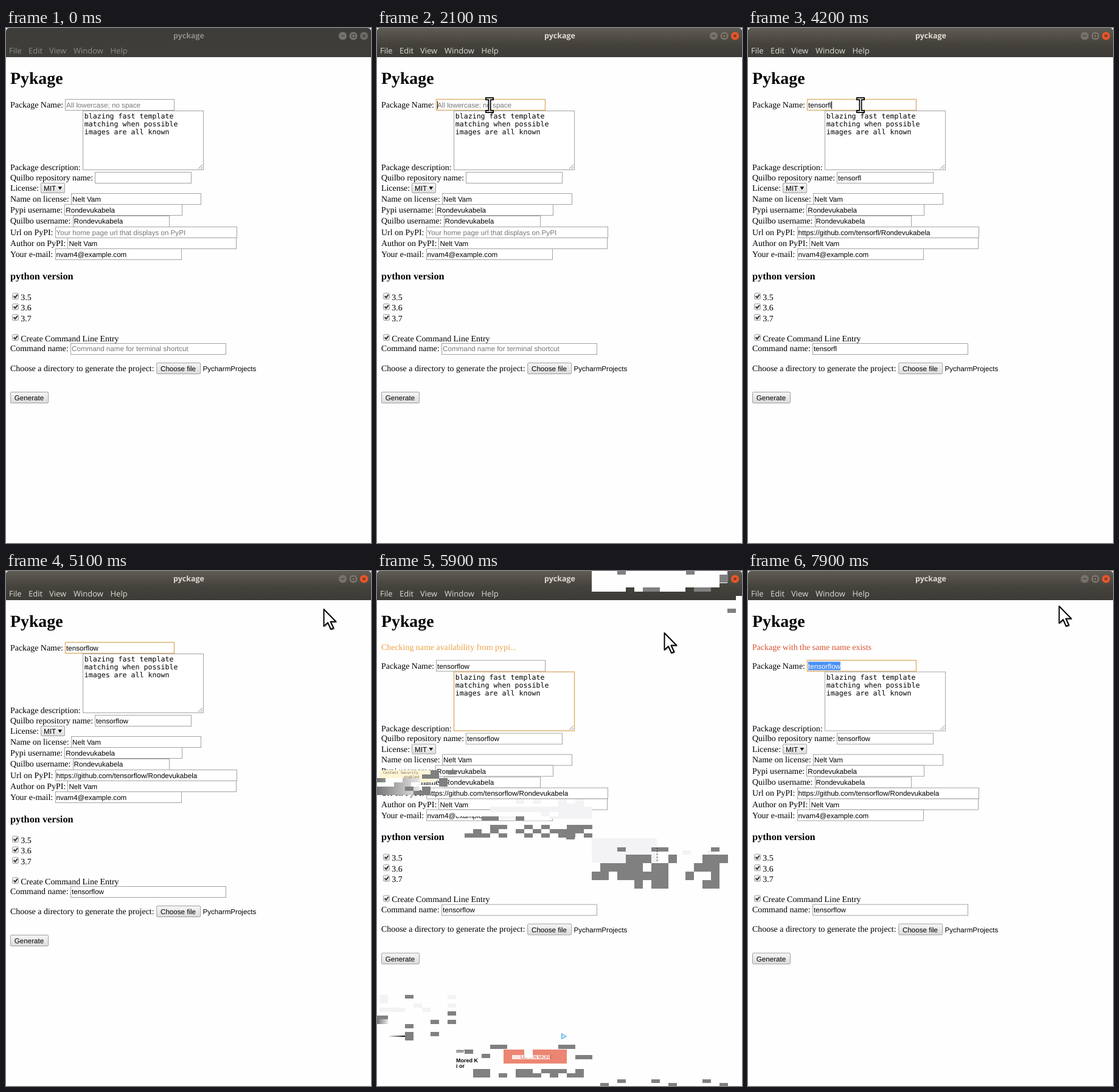
An HTML page for the animation above (8 s loop, 600 px wide and 848 px high).

```html
<!DOCTYPE html>
<html lang="en">
<head>
<meta charset="utf-8">
<title>pyckage</title>
<style>
html, body { margin: 0; width: 100%; height: 100%; overflow: hidden; background: #fefefe; }
svg { display: block; width: 600px; height: 848px; }
text { font: 13.93px "Liberation Serif", "Times New Roman", serif; text-rendering: geometricPrecision; white-space: pre; }
.h1 { font-size: 27.8px; font-weight: bold; }
.h3 { font-size: 16.3px; font-weight: bold; }
.ui { font: 11.62px "Liberation Sans", Arial, sans-serif; }
.mono { font: 11.62px "DejaVu Sans Mono", monospace; }
.bar { font: 13px "Open Sans", "Noto Sans", sans-serif; }
.title { font-size: 12.5px; font-weight: bold; }
.tiny { font: 6px "DejaVu Sans Mono", monospace; }
.box { fill: #fff; stroke: #a3a3a3; }
.box.focus { stroke: #ddb373; stroke-width: 1.5; }
.button { fill: url(#face); stroke: #a0a0a0; }
.hint { fill: #777; }
#chrome { --ink: #8f8c85; --close: #6d6b66; --mark: #3c3b37; }
#chrome.active { --ink: #dfdbd2; --close: #e9562a; --mark: #4b2a1c; }
#chrome:not(.active) #shine { display: none; }
</style>
</head>
<body>
<svg id="stage" viewBox="0 0 600 848"></svg>
<script>
const USER = "Rondevukabela", PERSON = "Nelt Vam", WORD = "tensorflow";
const LOOP = 8000, SHIFT = 29.6;
const fields = [];

const rect = (x, y, w, h, attrs = "") =>
  `<rect x="${x}" y="${y}" width="${w}" height="${h}" ${attrs}/>`;
const text = (x, y, s, cls = "", attrs = "") =>
  `<text x="${x}" y="${y}" class="${cls}" ${attrs}>${s}</text>`;
const snap = v => Math.floor(v) + .5;

// "under" is drawn between the box and its value.
function field(label, y, x, w, value = "", id = "", under = "") {
  fields.push([x, y - 13.5, w, 18.3]);
  return text(7, y, label) +
    rect(snap(x), snap(y - 13.3), Math.round(w), 18, `class="box" ${id && `id="${id}Box"`}`) +
    under + text(x + 1.6, y, value, "ui", id && `id="${id}"`);
}

const check = (y, label) =>
  rect(10.5, y - 11, 10, 10, 'rx="2" class="button"') +
  `<path d="M12.7 ${y - 6.2}l2.3 2.5 4-5" fill="none" stroke="#333" stroke-width="2"/>` +
  text(24.3, y, label);

const button = (x, y, w, label) =>
  rect(x, y - 13.5, w, 18, 'rx="1.5" class="button"') + text(x + 6.3, y, label, "ui");

function chrome() {
  const menu = [[5, "File"], [37, "Edit"], [71, "View"], [111, "Window"], [171.5, "Help"]];
  const shape = "M0 48V6Q0 0 6 0H594Q600 0 600 6V48Z";
  const knob = (x, fill, mark) =>
    `<circle cx="${x}" cy="13" r="6.6" style="fill:${fill}"/>` +
    `<path d="${mark}" transform="translate(${x} 13)" fill="none" style="stroke:var(--mark)" stroke-width="1.1"/>`;
  return `<path d="${shape}" fill="#3e3d39"/><path id="shine" d="${shape}" fill="url(#shade)"/>` +
    text(300.5, 17.3, "pyckage", "bar title", 'text-anchor="middle" style="fill:var(--ink)"') +
    menu.map(([x, s]) => text(x, 42, s, "bar", 'style="fill:var(--ink)"')).join("") +
    knob(553.5, "#75736c", "M-3 0H3") + knob(571, "#75736c", "M-2.5-2.5h5v5h-5z") +
    knob(588.5, "var(--close)", "M-2.2-2.2l4.4 4.4M2.2-2.2l-4.4 4.4");
}

function form() {
  fields.push([126.5, 136.5, 198, 97]);
  const lines = ["blazing fast template", "matching when possible", "images are all known"];
  return field("Package Name:", 131, 97.5, 179, "", "pkg",
      rect(99, 119.8, 54, 14, 'id="mark" fill="#4a90f5"')) +
    rect(99, 120.5, 1, 13, 'id="caret"') +
    rect(126.5, 136.5, 198, 97, 'class="box" id="area"') +
    lines.map((s, i) => text(128.7, 149.3 + 13 * i, s, "mono")).join("") +
    '<path d="M316 232l7-7M320 232l3-3" stroke="#888"/>' +
    text(7, 234, "Package description:") +
    field("Quilbo repository name:", 250.5, 146.5, 157.5, "", "repo") +
    text(7, 268, "License:") + rect(57.5, 255.5, 39, 16, 'rx="1.5" class="button"') +
    text(62, 268, "MIT", "ui") + '<path d="M85.5 261.3h6.6l-3.3 5.2z"/>' +
    field("Name on license:", 285.7, 107.5, 213.3, PERSON) +
    field("Pypi username:", 304, 96.7, 192.5, USER) +
    field("Quilbo username:", 322.3, 110, 157.5, USER) +
    field("Url on PyPI:", 340.6, 81, 297.5, "", "url") +
    field("Author on PyPI:", 359, 101.8, 276.7, PERSON) +
    field("Your e-mail:", 377.2, 81, 206.5, "nvam4@example.com") +
    text(7, 413.5, "python version", "h3") +
    check(447.6, "3.5") + check(465, "3.6") + check(482.5, "3.7") +
    check(515.6, "Create Command Line Entry") +
    field("Command name:", 532.3, 106.5, 255, "", "cmd") +
    text(7, 564.5, "Choose a directory to generate the project:") +
    button(247.7, 565, 72, "Choose file") + text(323.5, 565, "PycharmProjects", "ui") +
    button(7.5, 613, 62, "Generate");
}

// Torn screen: clusters of blocks scattered by a seeded generator.
function tear() {
  let seed = 11;
  const rnd = () => (seed = seed * 16807 % 2147483647) / 2147483647;
  const gray = "#808080", pale = "#f3f3f5", white = "#fefefe";
  const block = (x, y, w, h, fill = gray) => rect(x, y, w, h, `fill="${fill}"`);
  const blocks = (x, y, cols, rows, density, fill = gray, h = 7) => {
    let s = "";
    for (let i = 0; i < cols * rows; i++) {
      if (rnd() < density) s += block(x + i % cols * 14, y + (i / cols | 0) * h, 14, h, fill);
    }
    return s;
  };
  const label = (x, y, s, size, style = "") =>
    text(x, y, s, "ui", `style="font-size:${size}px;${style}"`);

  const top = block(353, 0, 210, 27, white) + block(563, 0, 13, 20, white) +
    blocks(353, 27, 14, 1, .5, white) + blocks(395, 27, 11, 1, .35) +
    block(395, 0, 14, 6) + block(508, 0, 14, 6) + block(563, 6, 14, 13) +
    block(576, 62, 14, 7) + block(590, 41, 10, 8, white);
  const left = block(4, 328, 91, 20, "#fdf5d6") +
    text(10, 334, "Content Security", "tiny", 'fill="#765"') + text(44, 341, "enabled", "tiny", 'fill="#765"') +
    block(0, 341, 70, 28, "url(#fade)") + blocks(0, 341, 5, 2, .4, white) + blocks(18, 355, 5, 2, .45) +
    block(74, 335, 14, 7) + block(88, 328, 14, 14) + block(102, 341, 14, 14) + block(116, 328, 14, 7);
  const middle = blocks(144, 376, 15, 2, .4, pale) + block(186, 388, 167, 20, pale) +
    blocks(130, 397, 12, 2, .6, white) + blocks(144, 404, 9, 1, .35) +
    blocks(144, 418, 15, 1, .4) + blocks(144, 425, 15, 2, .5) + block(311, 439, 14, 3);
  const right = block(353, 440, 107, 40, pale) + blocks(460, 446, 8, 3, .15, pale) +
    blocks(367, 455, 15, 1, .35) + blocks(381, 467, 14, 1, .5, gray, 14) +
    blocks(353, 481, 16, 2, .75, gray, 14) + blocks(367, 509, 15, 1, .45, gray, 14) +
    '<path d="M460.5 455V480" stroke="#444" stroke-dasharray="3 2"/>';
  const corner = blocks(4, 698, 9, 4, .15, pale) + block(46, 698, 14, 6) + block(116, 725, 14, 7) +
    block(0, 732, 18, 6) + block(0, 738, 18, 8, "url(#fade)") + block(46, 746, 14, 7) +
    block(88, 739, 14, 7) + block(116, 739, 14, 7) + block(46, 759, 14, 14) + block(88, 759, 14, 7) +
    '<path d="M18 766l28-1v2z"/>';
  const banner = block(208, 788, 104, 23, "#ec8573") + block(222, 797, 62, 7, "#fbe9e5") +
    label(236, 803, "LEARN MORE", 8, "fill:#d85a45") +
    label(130, 793, "sten", 8) + label(130, 809, "Mored K", 9, "font-weight:bold") +
    label(130, 818, "i or", 9, "font-weight:bold") +
    blocks(228, 788, 5, 2, .35, white) + blocks(158, 780, 13, 1, .45) + blocks(144, 788, 4, 2, .4) +
    blocks(312, 797, 3, 2, .4) + blocks(158, 820, 14, 2, .5) +
    '<path d="M303.5 761.5v9l8-4z" fill="#bfe4fb" stroke="#4aa8dc"/>';
  const bottom = [[367, 843], [395, 837], [451, 837], [479, 843], [535, 837], [563, 843]]
    .map(([x, y]) => block(x, y, 14, 6)).join("");
  return top + left + middle + right + corner + banner + bottom;
}

const stops = (...list) => list.map(([o, c]) => `<stop offset="${o}" stop-color="${c}"/>`).join("");
const gradient = (id, dir, ...list) =>
  `<linearGradient id="${id}" x2="${dir === "x" ? 1 : 0}" y2="${dir === "y" ? 1 : 0}">${stops(...list)}</linearGradient>`;
const beamPath = "M-4.5-10.5h9M0-10.5v21M-4.5 10.5h9";
const arrowPath = "M0 0V28L6.5 22 11.5 33 16 31 11 20.5H20Z";

const $ = id => document.getElementById(id);
$("stage").innerHTML = `<defs>
  ${gradient("face", "y", [0, "#f6f6f6"], [1, "#dcdcdc"])}
  ${gradient("shade", "y", [0, "#5f5c54"], [.55, "#45423d"], [1, "#3d3b37"])}
  ${gradient("fade", "x", [0, "#777"], [1, "#e6e6e6"])}
  </defs>${rect(0, 0, 600, 848, 'fill="#fefefe"')}
  <g id="chrome">${chrome()}</g>${text(7, 91.5, "Pykage", "h1")}${text(7, 130, "", "", 'id="msg"')}
  <g id="form">${form()}</g><g id="tear">${tear()}</g>
  <g id="cursor"><g id="arrow" stroke-linejoin="round" transform="translate(.5 1)">
    <path d="${arrowPath}" transform="translate(2 2)" opacity=".25"/>
    <path d="${arrowPath}" fill="#fff" stroke="#000" stroke-width="2"/></g>
  <g id="beam" fill="none" stroke-linecap="square"><path d="${beamPath}" stroke="#000" stroke-width="5"/>
    <path d="${beamPath}" stroke="#fff" stroke-width="1.6"/></g></g>`;

// time, x, y of the pointer
const path = [
  [100, 240, 368], [900, 20, 10], [1800, 24, 36], [2000, 185, 127], [4400, 185, 127],
  [5000, 522, 62], [5300, 522, 62], [5900, 472, 101], [6200, 590, 8], [6300, 590, 8],
  [6700, 275, 134], [7000, 215, 300], [7200, 215, 300], [7300, 156, 157], [7500, 70, 157], [7900, 511, 57]
];

function pointer(t) {
  const i = path.findIndex(p => p[0] >= t);
  if (i < 1) return path[0].slice(1);
  const [t0, x0, y0] = path[i - 1], [t1, x1, y1] = path[i];
  const k = (t - t0) / (t1 - t0), e = k * k * (3 - 2 * k);
  return [x0 + (x1 - x0) * e, y0 + (y1 - y0) * e];
}

// The name is typed, erased and typed again.
function typed(t) {
  const n = t < 2200 ? 0
    : t < 2800 ? Math.ceil((t - 2100) / 60)
    : t < 3600 ? 10 - Math.ceil((t - 2700) / 60)
    : Math.floor((t - 3500) / 85);
  return WORD.slice(0, Math.max(0, Math.min(10, n)));
}

const show = (id, on) => $(id).style.display = on ? "" : "none";

function fill(id, value, hint) {
  $(id).textContent = value || hint;
  $(id).classList.toggle("hint", !value);
}

function draw(now) {
  const t = Math.floor(now % LOOP / 100) * 100;
  const name = typed(t), moved = t >= 5300, picked = t >= 7400;

  $("chrome").classList.toggle("active", t >= 1000);
  $("form").setAttribute("transform", `translate(0 ${moved ? SHIFT : 0})`);
  $("msg").textContent = !moved ? "" : t < 6300
    ? "Checking name availability from pypi..." : "Package with the same name exists";
  $("msg").style.fill = t < 6300 ? "#eba447" : "#d9512f";

  fill("pkg", name, "All lowercase; no space");
  fill("repo", name, "");
  fill("url", name && `https://github.com/${name}/${USER}`, "Your home page url that displays on PyPI");
  fill("cmd", name, "Command name for terminal shortcut");

  $("pkgBox").classList.toggle("focus", t >= 2000 && !moved || t >= 7300);
  $("area").classList.toggle("focus", moved && t < 7300);
  $("pkg").style.fill = picked ? "#fff" : "";
  const width = name ? $("pkg").getComputedTextLength() : 0;
  $("mark").setAttribute("width", width);
  show("mark", picked);
  $("caret").setAttribute("x", 99 + width);
  show("caret", t >= 2000 && !moved && !(t > 4600 && (t - 4600) % 1000 >= 500));
  show("tear", t >= 5700 && t < 6200);

  const [x, y] = pointer(t), top = moved ? SHIFT : 0;
  const over = fields.some(([fx, fy, w, h]) => x > fx && x < fx + w && y > fy + top && y < fy + top + h);
  show("cursor", t >= 100);
  show("beam", over);
  show("arrow", !over);
  $("cursor").setAttribute("transform", `translate(${x} ${y})`);
}

function tick() {
  draw(performance.now());
  requestAnimationFrame(tick);
}
tick();
</script>
</body>
</html>
```
